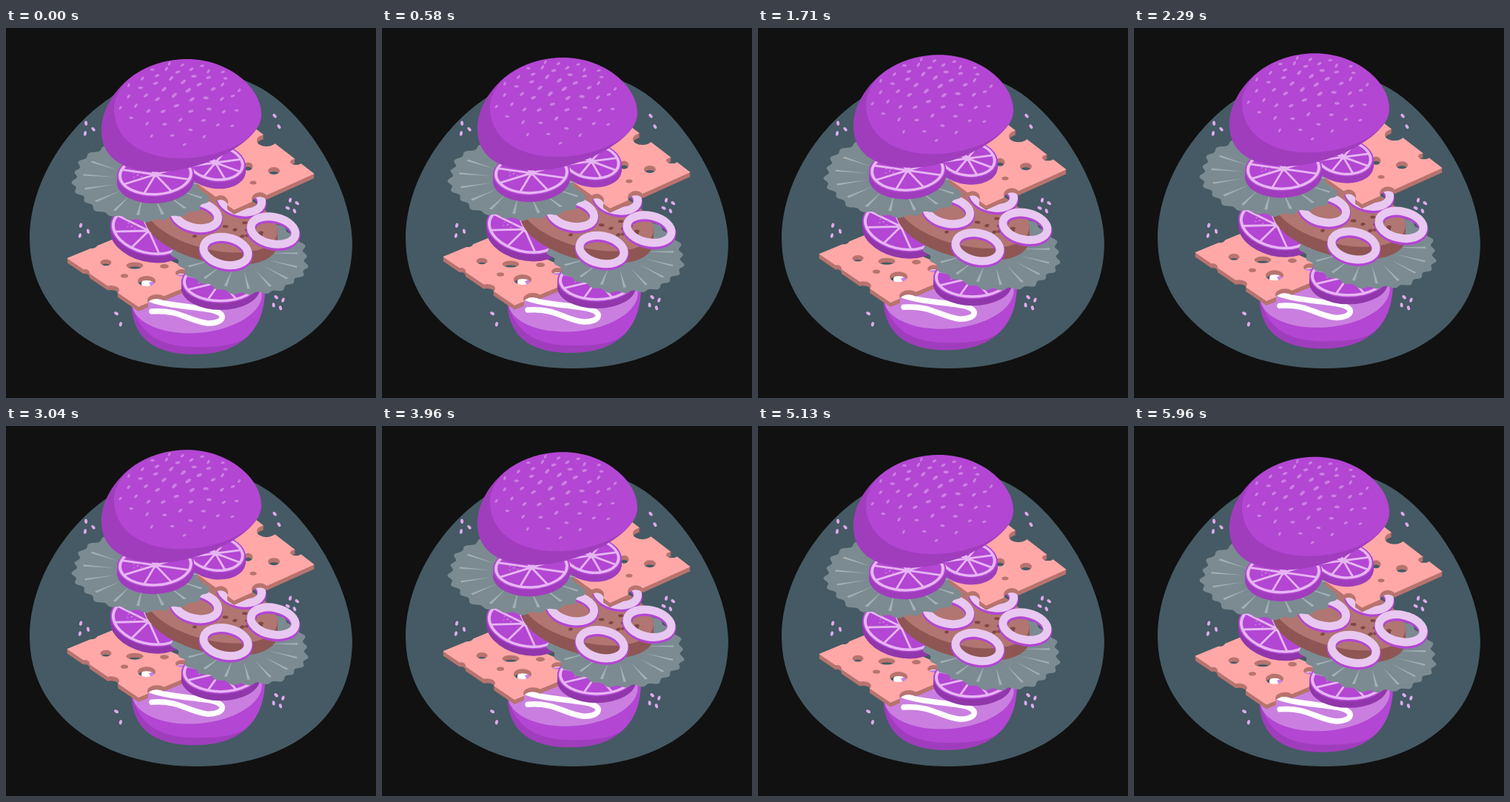
An HTML page that plays this animation: 500x500 px, repeating every 6 s.

```html
<!DOCTYPE html>
<html lang="en">
<head>
<meta charset="utf-8">
<title>Floating burger</title>
<style>
  html, body { margin: 0; width: 100%; height: 100%; overflow: hidden; background: #111; }
  svg { display: block; width: 100%; height: 100%; }
</style>
</head>
<body>
<svg id="stage" viewBox="0 0 500 500"></svg>
<script>
const C = {
  plate: '#455a64', main: '#b346d3', dark: '#a03dbd', deep: '#9137ab', light: '#ca7fe0',
  pale: '#e7b5f3', onion: '#e8c8f0', cheese: '#ffa8a7', crust: '#b8746f',
  meat: '#b17572', side: '#8f5654', crumb: '#7f4744', leaf: '#7b8b91', vein: '#a3b0b5'
};
const TURN = Math.PI * 2, GOLDEN = 2.39996;

let seed = 7;
const random = (min, max) => {
  seed = seed * 16807 % 2147483647;
  return min + (max - min) * seed / 2147483647;
};
const repeat = (n, make) => Array.from({ length: n }, (_, i) => make(i)).join('');

const path = (d, fill, extra = '') => `<path d="${d}" fill="${fill}" ${extra}/>`;
const line = (d, color, width) =>
  path(d, 'none', `stroke="${color}" stroke-width="${width}" stroke-linecap="round"`);
const oval = (x, y, rx, ry, fill, turn = 0, extra = '') =>
  `<ellipse cx="${x}" cy="${y}" rx="${rx}" ry="${ry}" fill="${fill}" transform="rotate(${turn} ${x} ${y})" ${extra}/>`;
const place = (x, y, turn, content) => `<g transform="translate(${x} ${y}) rotate(${turn})">${content}</g>`;

// Thick round slice
const disc = (x, y, rx, ry, turn, depth, side, top) =>
  repeat(depth, i => oval(x, y + depth - i, rx, ry, side, turn)) + oval(x, y, rx, ry, top, turn);

function tomato(x, y, rx, ry, turn, side = C.deep) {
  const spokes = repeat(8, i => {
    const a = .35 + i * TURN / 8;
    return `M0 0L${(rx - 4) * Math.cos(a)} ${(ry - 4) * Math.sin(a)}`;
  });
  const face = oval(0, 0, rx - 2, ry - 1.5, C.pale) + oval(0, 0, rx - 6, ry - 5, C.main) +
    line(spokes, C.pale, 2.8) + oval(0, 0, 5, 3.5, C.pale) +
    repeat(6, i => oval(i % 3 * 5 - 29, i % 2 * 3 + (i > 2) * 2 - 3, 1.5, .7, C.light, -15));
  return disc(x, y, rx, ry, turn, 9, side, C.main) + place(x, y, turn, face);
}

function onion(x, y, rx, ry) {
  const ring = (dy, color, width) =>
    oval(x, y + dy, rx, ry, 'none', 12, `stroke="${color}" stroke-width="${width}"`);
  return ring(1.8, C.main, 13) + ring(-.5, C.onion, 11);
}

// Thick sheet with oval holes; holes on the border become bites
function cheese(id, outline, holes) {
  const cuts = holes.map(([x, y, rx, ry]) => oval(x, y, rx, ry, '#000')).join('');
  const sheet = color => path(outline, color, `mask="url(#${id})"`);
  return `<mask id="${id}">${path(outline, '#fff')}${cuts}</mask>` +
    repeat(6, i => place(0, 6 - i, 0, sheet(C.crust))) + sheet(C.cheese);
}

// Oval with a ruffled border and veins that spread from its middle
function lettuce(x, y, rx, ry, turn) {
  const at = (a, r) => [rx * r * Math.cos(a), ry * r * Math.sin(a)];
  const rim = repeat(360, i => {
    const a = i * TURN / 360;
    return (i ? 'L' : 'M') + at(a, 1 + .028 * Math.sin(25 * a) + .018 * Math.sin(9 * a));
  });
  const veins = repeat(16, i => {
    const a = (i + .35) * TURN / 16;
    return `M${at(a, .45)}L${at(a + .025, .88)}L${at(a - .025, .88)}Z`;
  });
  return place(x, y, turn, path(rim + 'Z', C.leaf) + path(veins, C.vein));
}

const bottomBun =
  path('M169 365C169 400 180 441 255 441C330 441 350 395 350 350Z', C.dark) +
  path('M169 365C175 410 205 431 255 431C285 431 308 430 325 418C345 400 350 375 350 350Z', C.main) +
  oval(258, 366, 88, 46, C.light, -5) +
  line('M246 328C212 331 174 344 191 348M193 366C216 375 246 376 271 380C303 384 295 400 272 399C247 396 233 380 197 383', '#fff', 7.5);

const lowerCheese = cheese('lower', 'M82 311L150 283L275 337L179 377Z', [
  [115, 294, 8, 4], [107, 331, 6, 5], [142, 354, 11, 6], [204, 368, 13, 8], [238, 331, 9, 5],
  [135, 317, 7.5, 4.3], [174, 321, 11.5, 4.5], [160, 335, 5, 2.7], [190, 342, 12, 7], [214, 322, 6, 3]
]);

const upperCheese = cheese('upper', 'M258 210L335 134L417 197L308 246Z', [
  [352, 152, 13, 8], [392, 181, 8, 4], [343, 231, 11, 9], [290, 235, 10, 9],
  [362, 193, 8, 5], [327, 187, 6.5, 5.5], [334, 209, 4.5, 2.5]
]);

const patty = disc(277, 257, 92, 42, 14, 17, C.side, C.meat) +
  repeat(14, () => oval(random(255, 352), random(262, 283), random(2.5, 4), 2, C.crumb, random(-20, 20)));

const onions = onion(318, 232, 28, 17) + onion(257, 253, 30, 17.5) +
  onion(361, 274, 30.5, 18) + onion(297, 302, 30.5, 18.5);

const sesame = repeat(54, i => {
  const r = Math.sqrt((i + .5) / 54), a = i * GOLDEN;
  return oval(238 + 86 * r * Math.cos(a), 84 + 18 * r * r + 56 * r * Math.sin(a),
    4.4 - 1.7 * r, 2.2 - .7 * r, C.light, random(-65, 10));
});

const topBun =
  path('M175 62C145 82 127 115 129 142C131 180 165 195 210 194.5C265 193 345 155 345 117L300 60Z', C.dark) +
  path('M146 110C146 70 195 42 245 42C300 42 345 80 345 117C345 150 290 176 236 176C180 176 146 148 146 110Z', C.main) +
  sesame;

// Loose seeds around the burger: x, y, count
const loose = [[111, 136, 3], [366, 126, 2], [387, 240, 4], [104, 274, 3], [152, 393, 2], [368, 371, 4]]
  .map(([x, y, n]) => repeat(n, i => {
    const a = -2 + i * TURN / n;
    return oval(x + 7 * Math.cos(a), y + 8 * Math.sin(a), 3.2, 2, '#dfa9ee', random(30, 110));
  })).join('');

document.getElementById('stage').innerHTML =
  path('M32 285C32 210 80 135 140 95C190 55 275 45 325 72C400 100 468 215 468 290C468 400 375 460 258 460C130 460 32 390 32 285Z', C.plate) +
  loose + '<g id="burger">' + bottomBun + lowerCheese + tomato(290, 343, 53, 29, 0) +
  tomato(193, 274, 53, 33, 14) + lettuce(315, 304, 92, 54, 9) + patty + onions +
  lettuce(190, 205, 98, 55, 0) + upperCheese + tomato(283, 182, 41, 26, 8, C.dark) +
  tomato(202, 198, 52, 30, -3, C.dark) + topBun + '</g>';

const burger = document.getElementById('burger');
const LOOP = 6000, RISE = 10;

function draw() {
  const p = performance.now() % LOOP / LOOP;
  const lift = RISE * (1 - Math.abs(2 * p - 1));
  burger.setAttribute('transform', `translate(0 ${-lift})`);
  requestAnimationFrame(draw);
}
draw();
</script>
</body>
</html>
```
